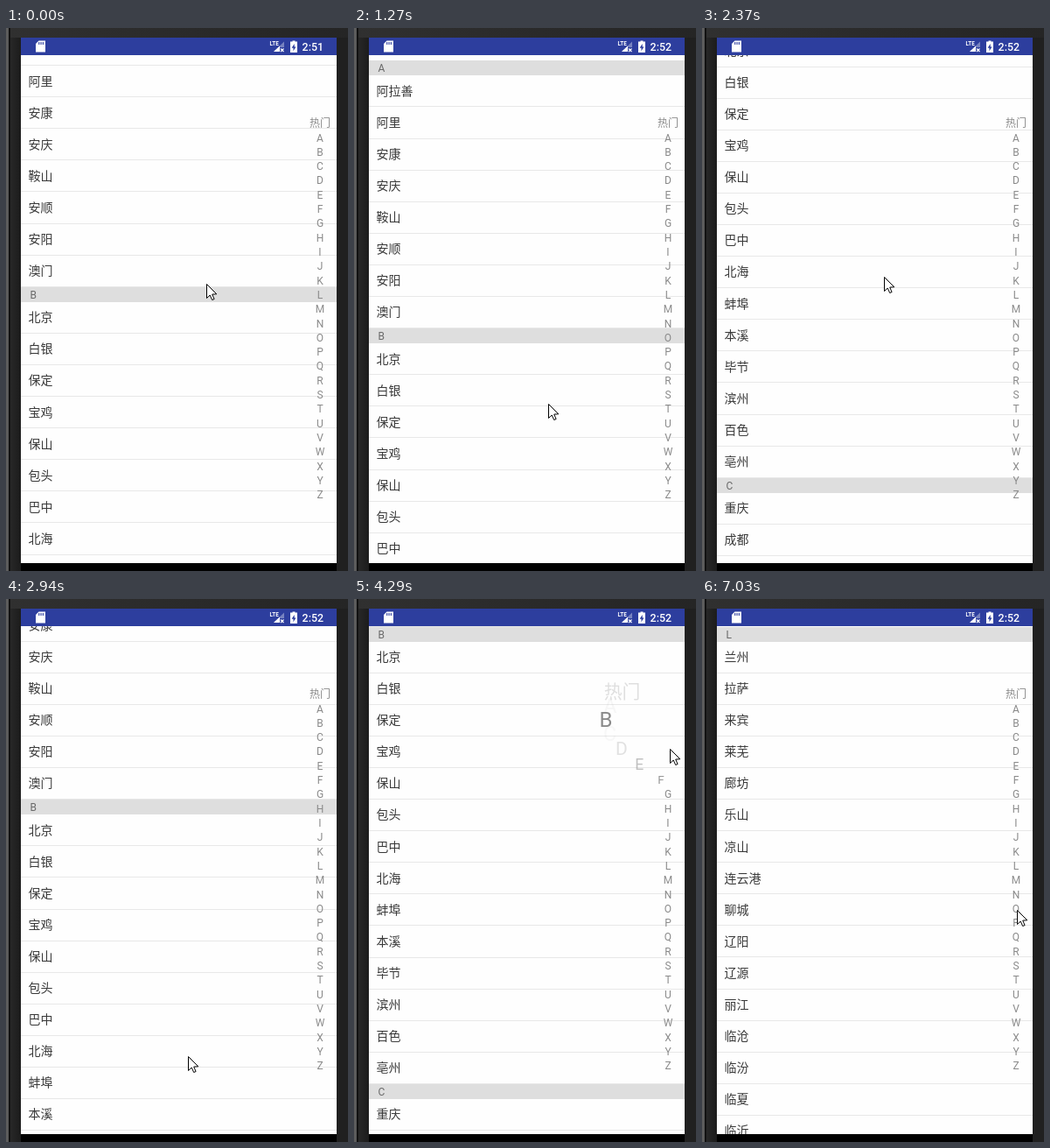
Write an HTML page with a canvas that moves like this. It is 391 by 620 pixels and loops after 8 s.

```html
<!DOCTYPE html>
<html lang="zh">
<head>
<meta charset="utf-8">
<title>City list</title>
<style>
html, body { margin: 0; width: 100%; height: 100%; overflow: hidden; background: #000; }
canvas { display: block; width: 391px; height: 620px; }
</style>
</head>
<body>
<canvas id="stage"></canvas>
<script>
const W = 391, H = 620, LOOP = 8000;
const STEP = 134;
const LEFT = 17, TOP = 31, WIDTH = 361, HEIGHT = 580;
const ROW = 36.07, HEAD = 17.3, PITCH = 16.31;
const FONT = '"Roboto", "Noto Sans CJK SC", "Noto Sans CJK", sans-serif';
const canvas = document.getElementById('stage');
const ctx = canvas.getContext('2d');
const dpr = window.devicePixelRatio || 1;
canvas.width = W * dpr;
canvas.height = H * dpr;

const cities = {
  A: '阿拉善 阿里 安康 安庆 鞍山 安顺 安阳 澳门',
  B: '北京 白银 保定 宝鸡 保山 包头 巴中 北海 蚌埠 本溪 毕节 滨州 百色 亳州',
  C: '重庆 成都 长沙 长春 沧州 常德 昌都 长治 常州 巢湖 潮州 承德 郴州 赤峰 池州 崇左',
  D: '大连 东莞 大理 丹东 大庆 大同 大兴安岭 德宏 德阳 德州 定西 迪庆 东营',
  E: '鄂尔多斯 恩施 鄂州',
  F: '福州 防城港 佛山 抚顺 抚州 阜新 阜阳',
  G: '广州 桂林 贵阳 甘南 赣州 甘孜 广安 广元 贵港 果洛',
  H: '杭州 哈尔滨 合肥 海口 呼和浩特 海北 海东 海南 海西 邯郸 汉中 鹤壁 河池 鹤岗 黑河 衡水',
  J: '济南 佳木斯 吉安 江门 焦作 嘉兴 嘉峪关 揭阳 吉林 金昌 晋城 景德镇 荆门 荆州 金华 济宁',
  K: '昆明 开封 克拉玛依 喀什',
  L: '兰州 拉萨 来宾 莱芜 廊坊 乐山 凉山 连云港 聊城 辽阳 辽源 丽江 临沧 临汾 临夏 临沂 丽水'
};
const index = ['热门', ...'ABCDEFGHIJKLMNOPQRSTUVWXYZ'];
const lastSection = index.indexOf('L');

// Lay the list out once; y runs from the top of section A.
const items = [], sectionTop = {};
let end = 0;
for (const [letter, names] of Object.entries(cities)) {
  sectionTop[letter] = end;
  items.push({ y: end, head: letter });
  end += HEAD;
  for (const name of names.split(' ')) {
    items.push({ y: end, name });
    end += ROW;
  }
}

// Key points: step, then values.
const pointer = [[0, 229, 292], [4, 296, 227], [8, 225, 480], [13, 210, 225], [16, 208, 225],
  [21, 208, 522], [30, 361, 133], [32, 361, 171], [39, 358, 309], [42, 358, 309],
  [45, 362, 275], [48, 360, 355]];
const scroll = [[0, 295.7], [4, 395.7], [8, 395.7], [13, 132], [16, -68], [21, 229], [25, 290]];

const ramp = (n, a, b) => Math.min(1, Math.max(0, (n - a) / (b - a)));

function at(keys, n) {
  const i = keys.findIndex(k => k[0] > n);
  const b = keys.at(i), a = i < 0 ? b : keys[i - 1];
  const u = a === b ? 0 : ramp(n, a[0], b[0]);
  return a.slice(1).map((v, j) => v + (b[j + 1] - v) * u);
}

function rect(x, y, w, h, fill) {
  ctx.fillStyle = fill;
  ctx.fillRect(x, y, w, h);
}

function text(s, x, y, size, color, align = 'left', weight = 400) {
  ctx.font = `${weight} ${size}px ${FONT}`;
  ctx.textAlign = align;
  ctx.fillStyle = color;
  ctx.fillText(s, x, y);
}

function poly(points, color) {
  ctx.beginPath();
  for (let i = 0; i < points.length; i += 2) ctx.lineTo(points[i], points[i + 1]);
  ctx.closePath();
  ctx.fillStyle = color;
  ctx.fill();
}

function fade(width, from, to) {
  const g = ctx.createLinearGradient(0, 0, width, 0);
  g.addColorStop(0, from);
  g.addColorStop(1, to);
  return g;
}

function drawBezel() {
  rect(0, 0, W, H, '#202020');
  rect(0, 0, W, 11, fade(W, '#303030', '#252525'));
  rect(0, 11, LEFT, H, fade(LEFT, '#2c2c2c', '#1c1c1c'));
  rect(0, 0, 3, H, '#5c5c5c');
  rect(3, 0, 2, H, '#121212');
  rect(LEFT, TOP + HEIGHT, WIDTH, 9, '#000');
}

function drawStatus(n) {
  const blue = '#2d3e9e';
  rect(LEFT, 11, WIDTH, TOP - 11, blue);
  poly([37.5, 14.5, 45, 14.5, 45, 27.5, 34, 27.5, 34, 18], '#fff');
  for (let i = 0; i < 3; i++) rect(37.2 + i * 2.3, 16, 1.1, 3, blue);
  poly([318, 15.5, 318, 27, 306, 27], '#7783c0');
  poly([313, 20.5, 313, 27, 306, 27], '#fff');
  rect(313, 22, 6, 6, blue);
  ctx.strokeStyle = '#fff';
  ctx.lineWidth = 1.2;
  ctx.beginPath();
  ctx.moveTo(314, 23.5); ctx.lineTo(317.5, 27);
  ctx.moveTo(317.5, 23.5); ctx.lineTo(314, 27);
  ctx.stroke();
  text('LTE', 301.5, 20, 6.3, '#fff', 'left', 700);
  rect(327.5, 14.5, 3, 2, '#fff');
  rect(325, 15.5, 8, 12.5, '#fff');
  poly([329.7, 18, 326.6, 22.8, 328.5, 22.8, 328.5, 26.3, 331.5, 21.4, 329.7, 21.4], blue);
  text(n < 6 ? '2:51' : '2:52', 338.6, 26, 12.4, '#fff', 'left', 500);
}

function drawList(offset) {
  text('定位城市', 25.5, offset - 43.5, 12.3, '#777');
  for (const item of items) {
    const y = item.y + offset;
    if (y < -10 || y > TOP + HEIGHT) continue;
    if (item.head) {
      rect(LEFT, Math.round(y), WIDTH, 17, '#dedede');
      text(item.head, 27.5, y + 13.3, 12, '#6a6a6a');
    } else {
      rect(LEFT, Math.round(y + ROW) - 1, WIDTH, 1, '#e8e8e8');
      text(item.name, 25.5, Math.round(y + 22.3), 14, '#3a3a3a');
    }
  }
}

const nearest = center => Math.round((center - 109) / PITCH);

function drawIndex(center, amount) {
  index.forEach((label, i) => {
    const y = 109 + i * PITCH, d = Math.abs(y - center);
    const bend = d < 70 ? amount * Math.cos(d / 70 * Math.PI / 2) : 0;
    ctx.globalAlpha = i === nearest(center) ? 1 : 1 - bend;
    text(label, 359 - 71 * bend, y + 4.2, 12 + 12 * bend, '#8a8a8a', 'center');
  });
  ctx.globalAlpha = 1;
}

function drawCursor(x, y) {
  ctx.save();
  ctx.translate(x + 0.5, y + 0.5);
  ctx.lineWidth = 1;
  ctx.strokeStyle = '#000';
  poly([0, 0, 0, 16, 3.7, 12.5, 6.2, 18, 8.6, 17, 6.2, 11.6, 11.3, 11.3], '#fff');
  ctx.stroke();
  ctx.restore();
}

function sectionAt(center) {
  let i = Math.min(lastSection, Math.max(1, nearest(center)));
  while (!(index[i] in cities)) i--;
  return index[i];
}

function draw(time) {
  const n = Math.floor(time / STEP);
  // The index bulge trails the pointer by one step.
  const center = at(pointer, Math.max(0, n - 1))[1] - 10;
  const amount = ramp(n, 30, 32) - ramp(n, 41, 42) + ramp(n, 42, 44) - ramp(n, 50, 52);
  const offset = n < 31
    ? at(scroll, n)[0] - sectionTop.B
    : TOP + 0.5 - sectionTop[sectionAt(center)];

  ctx.setTransform(dpr, 0, 0, dpr, 0, 0);
  drawBezel();
  ctx.save();
  ctx.beginPath();
  ctx.rect(LEFT, TOP, WIDTH, HEIGHT);
  ctx.clip();
  rect(LEFT, TOP, WIDTH, HEIGHT, '#fefefe');
  drawList(offset);
  drawIndex(center, amount);
  ctx.restore();
  drawStatus(n);
  drawCursor(...at(pointer, n).map(Math.round));
}

const start = performance.now();
function loop() {
  draw((performance.now() - start) % LOOP);
  requestAnimationFrame(loop);
}
loop();
</script>
</body>
</html>
```
